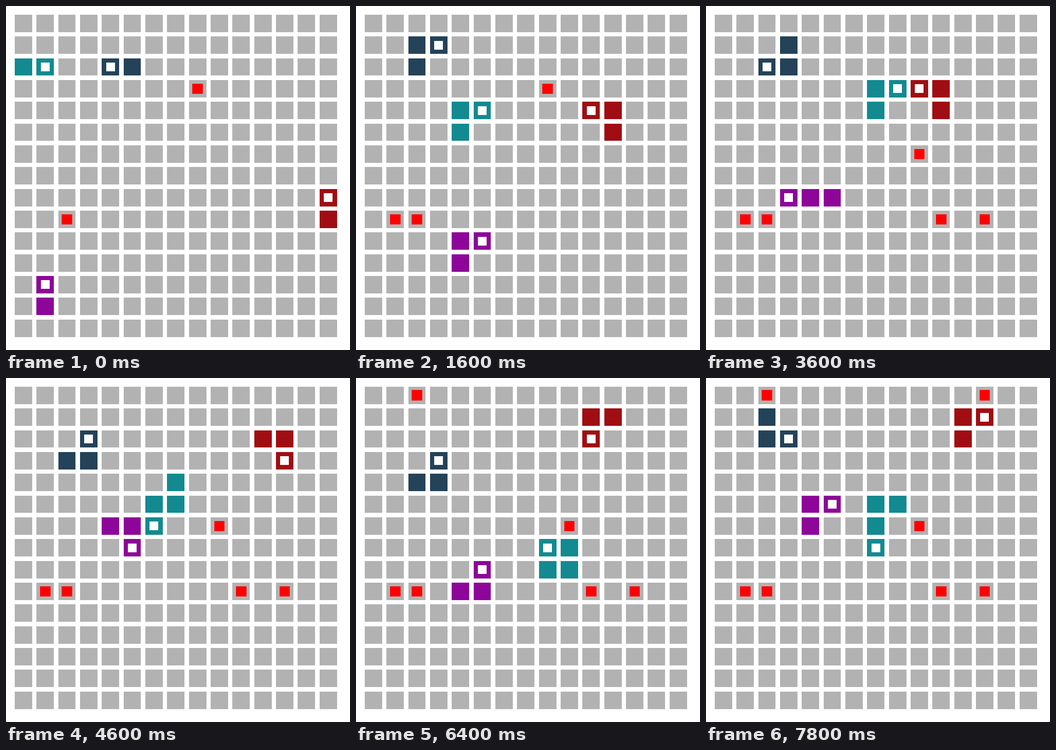
An HTML page that plays this animation: 748x748 px, repeating every 8 s.

```html
<!DOCTYPE html>
<html lang="en">
<head>
<meta charset="utf-8">
<title>Snakes on a grid</title>
<style>
  html, body { margin: 0; width: 100%; height: 100%; overflow: hidden; background: #fff; }
  svg { display: block; width: 100vw; height: 100vh; }
</style>
</head>
<body>
<svg viewBox="0 0 748 748" shape-rendering="crispEdges">
  <g id="grid"></g>
  <g id="actors"></g>
</svg>
<script>
const SIZE = 15, STEP_MS = 200, STEPS = 40;
const PITCH = 748 / 15.8, CELL = PITCH * 0.8, MARGIN = PITCH * 0.4;
const DIRS = { U: [0, -1], D: [0, 1], L: [-1, 0], R: [1, 0] };

// Each path begins at the first tail cell; one move per step.
const snakes = [
  { color: '#128a90', start: [0, 2], growAt: 19,
    moves: 'R DRDRDRUR DRURD LURUR DLDLDDRDR URDLU LURULDD' },
  { color: '#244258', start: [5, 2],
    moves: 'L LULLDRUR DLDRU LURDL LDRRUULDR DLDRU RULULDR' },
  { color: '#a00d12', start: [14, 9],
    moves: 'U ULULULUL ULDLD RURUL URRRDDLUR ULULD DRRULUR' },
  { color: '#8d0699', start: [1, 13],
    moves: 'U RURDRUUR DRURU LULLL URURDDRDL DLURU RULULUR' }
];

// Cell, first step shown, step at which it is eaten.
const foods = [
  { at: [8, 3], from: 0, to: 18 },
  { at: [2, 9], from: 0 },
  { at: [1, 9], from: 2 },
  { at: [10, 9], from: 10 },
  { at: [12, 9], from: 18 },
  { at: [9, 6], from: 18 },
  { at: [2, 0], from: 26 },
  { at: [12, 0], from: 34 }
];

for (const s of snakes) {
  s.path = [s.start];
  for (const m of s.moves.replace(/ /g, '')) {
    const [x, y] = s.path[s.path.length - 1], [dx, dy] = DIRS[m];
    s.path.push([x + dx, y + dy]);
  }
}

const snap = v => Math.round(v - 0.02);

// A square centred in a cell, snapped to whole pixels.
function square([col, row], fill, scale = 1) {
  const inset = MARGIN + CELL * (1 - scale) / 2, side = CELL * scale;
  const x = col * PITCH + inset, y = row * PITCH + inset;
  const w = snap(x + side) - snap(x), h = snap(y + side) - snap(y);
  return `<rect x="${snap(x)}" y="${snap(y)}" width="${w}" height="${h}" fill="${fill}"/>`;
}

function drawSnake(s, step) {
  const length = step >= s.growAt ? 4 : 3;
  const body = s.path.slice(Math.max(0, step + 2 - length), step + 2);
  return body.map(c => square(c, s.color)).join('') +
    square(body[body.length - 1], '#fff', 0.5);
}

function drawStep(step) {
  const shown = foods.filter(f => step >= f.from && step < (f.to ?? STEPS));
  return shown.map(f => square(f.at, '#f00', 0.6)).join('') +
    snakes.map(s => drawSnake(s, step)).join('');
}

const actors = document.getElementById('actors');
document.getElementById('grid').innerHTML = Array.from({ length: SIZE * SIZE },
  (_, i) => square([i % SIZE, Math.floor(i / SIZE)], '#b2b2b2')).join('');

let last = -1;
function render(ms) {
  const step = Math.floor(ms / STEP_MS) % STEPS;
  if (step === last) return;
  last = step;
  actors.innerHTML = drawStep(step);
}

const t0 = performance.now();
function tick() {
  render(performance.now() - t0);
  requestAnimationFrame(tick);
}
tick();
</script>
</body>
</html>
```
